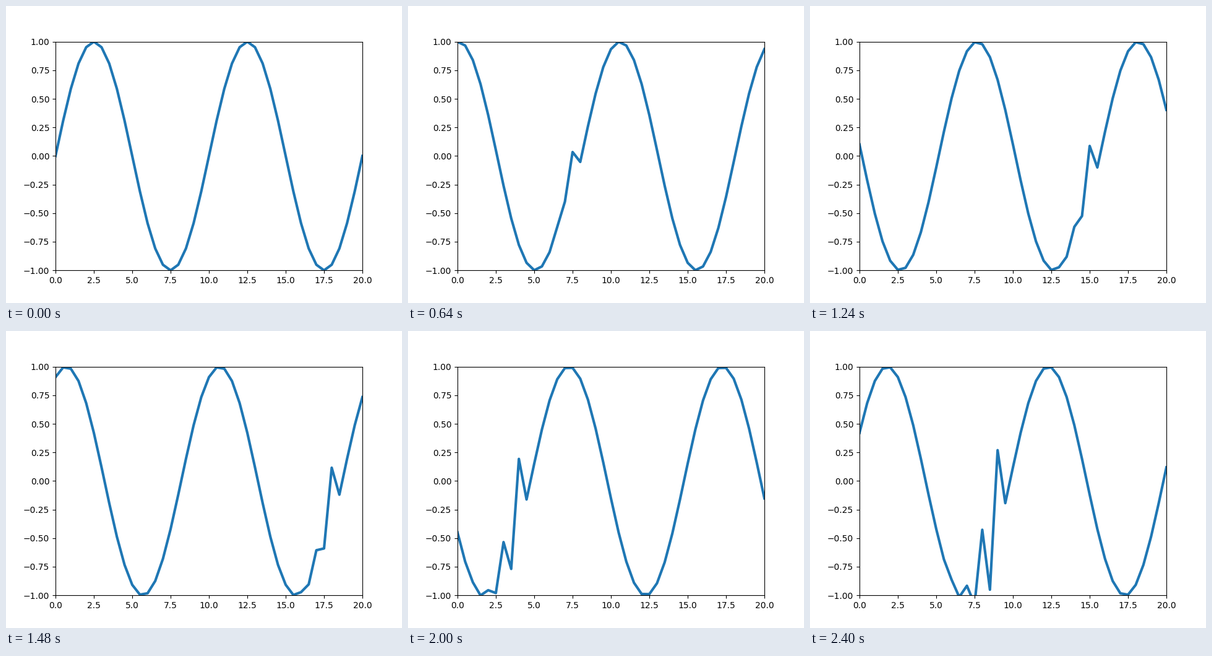
These frames come from a looping animation (640 px wide and 480 px high, 2.44 s). A matplotlib script:

```python
"""Advection of a sine wave with the Lax-Wendroff scheme on a periodic grid."""
import numpy as np
import matplotlib.pyplot as plt
from matplotlib.animation import FuncAnimation

LENGTH = 20.0
DX = 0.5
COURANT = 1.01  # just above the stability limit
STEPS = 61


def advance(u):
    """One Lax-Wendroff step with wrap-around boundaries."""
    left, right = np.roll(u, 1), np.roll(u, -1)
    return (u - COURANT / 2 * (right - left)
            + COURANT**2 / 2 * (right - 2 * u + left))


x = np.arange(0, LENGTH + DX / 2, DX)
history = [np.sin(2 * np.pi * x / 10)]
for _ in range(STEPS - 1):
    history.append(advance(history[-1]))

fig, ax = plt.subplots(figsize=(6.4, 4.8), dpi=100)
ax.set_xlim(0, LENGTH)
ax.set_ylim(-1, 1)
line, = ax.plot(x, history[0], lw=3)


def update(step):
    line.set_ydata(history[step])
    return line,


anim = FuncAnimation(fig, update, frames=STEPS, interval=40,
                     repeat=True, repeat_delay=0)
plt.show()
```
